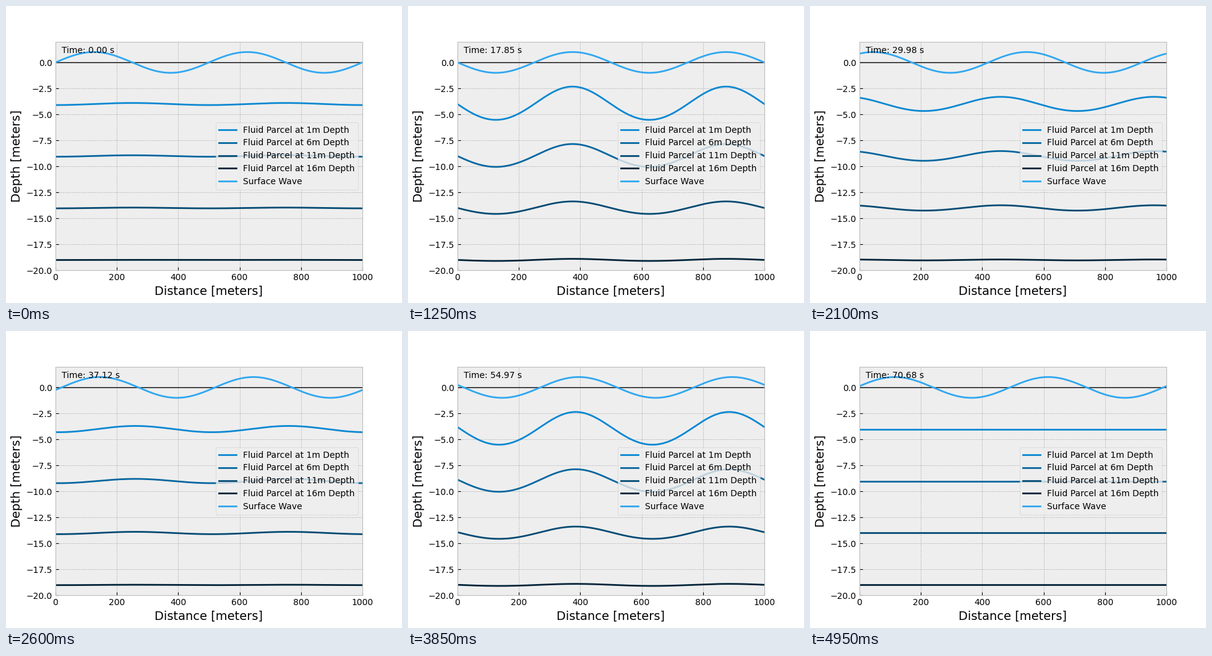
These frames come from a looping animation (640x480 px, 5000 ms). A matplotlib script:

```python
import matplotlib.pyplot as plt
import numpy as np
from matplotlib.animation import FuncAnimation

plt.style.use("bmh")

FRAMES = 100
STEPS_PER_PERIOD = 50
AMPLITUDE = 1.0
WATER_DEPTH = 20.0
WAVELENGTH = 500.0
GRAVITY = 9.81

k = 2 * np.pi / WAVELENGTH
speed = np.sqrt(GRAVITY * WATER_DEPTH)  # shallow water
dt = WAVELENGTH / speed / STEPS_PER_PERIOD
omega = k * speed

x = np.linspace(0, 1000, 1000)
times = np.arange(FRAMES) * dt
phase = k * x[None, :] - omega * times[:, None]
surface = AMPLITUDE * np.sin(phase)

# Vertical speed falls linearly to zero at the bed, so every Euler step
# scales a parcel's height above the bed by the same factor.
growth = np.cumprod(1 - AMPLITUDE / WATER_DEPTH * omega * dt * np.cos(phase), axis=0)

parcels = [
    (1, -4, "#0a88d2"),
    (6, -9, "#0667a0"),
    (11, -14, "#054b74"),
    (16, -19, "#03253a"),
]

fig, ax = plt.subplots(figsize=(6.4, 4.8), dpi=100)
ax.set_xlim(0, 1000)
ax.set_ylim(-20, 2)
ax.set_xlabel("Distance [meters]", fontsize=14)
ax.set_ylabel("Depth [meters]", fontsize=14)
ax.axhline(0, color="black", linewidth=1)

tracks = []
for depth, start, color in parcels:
    line, = ax.plot(x, np.full_like(x, start), color=color, linewidth=2,
                    label=f"Fluid Parcel at {depth}m Depth")
    tracks.append((line, start + WATER_DEPTH))
wave, = ax.plot(x, surface[0], color="#30a8f0", linewidth=2, label="Surface Wave")
clock = ax.text(0.02, 0.95, "", transform=ax.transAxes)
ax.legend(loc="center right")


def update(i):
    for line, height in tracks:
        line.set_ydata(height * growth[i] - WATER_DEPTH)
    wave.set_ydata(surface[i])
    clock.set_text(f"Time: {times[i]:.2f} s")
    return [line for line, _ in tracks] + [wave, clock]


anim = FuncAnimation(fig, update, frames=FRAMES, interval=50, repeat=True)
plt.show()
```
